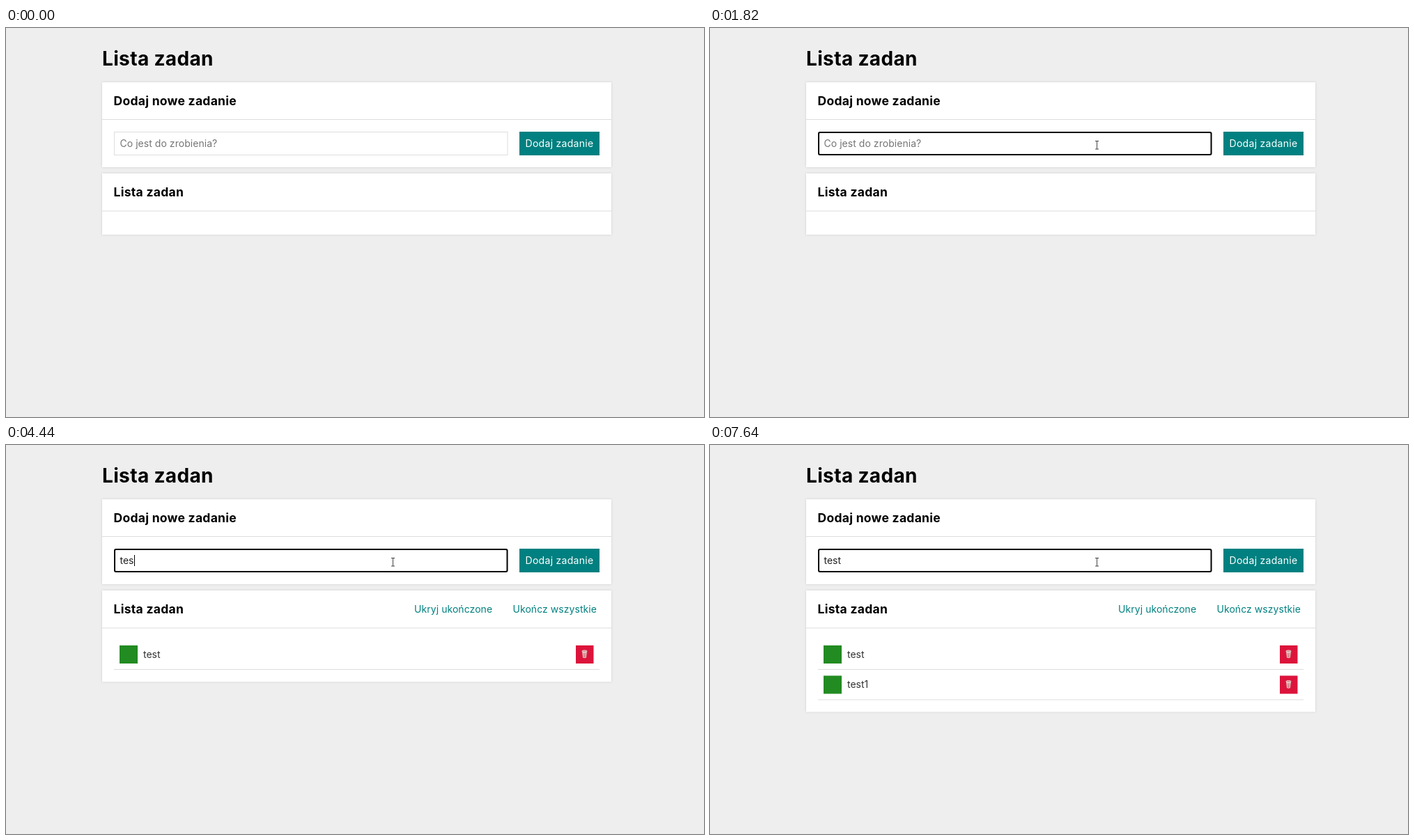
Write an HTML page that moves like this. It is 1002 by 559 pixels and loops after 8000 ms.

```html
<!DOCTYPE html>
<html lang="pl">
<head>
<meta charset="utf-8">
<title>Lista zadan</title>
<style>
  html, body { margin: 0; width: 100%; height: 100%; overflow: hidden; background: #eee; }
  svg { display: block; width: 1002px; height: 559px; font: 14px Inter, "Open Sans", sans-serif; }
  .card { fill: #fff; filter: drop-shadow(0 0 1.5px #ccc); }
  .rule { fill: #ddd; }
  .h1, .h2 { font-weight: 700; fill: #000; }
  .h1 { font-size: 28px; letter-spacing: .35px; }
  .h2 { font-size: 17.5px; letter-spacing: .28px; }
  .link { fill: teal; letter-spacing: .06px; }
  .button { fill: #fff; letter-spacing: .3px; }
  .hint { fill: #757575; letter-spacing: .04px; }
  .typed { fill: #222; }
  .item { fill: #333; }
</style>
</head>
<body>
<svg viewBox="0 0 1002 559">
  <defs>
    <g id="row">
      <rect x="163" y="288" width="26" height="26" fill="forestgreen"/>
      <rect x="818" y="288" width="25.5" height="26" fill="crimson"/>
      <path d="M827 296.5L828 305.5Q830.5 307 833 305.5L834 296.5Z" fill="#e9c9c4"/>
      <path d="M828.7 298.5l.5 6.5M830.5 298.5v7M832.3 298.5l-.5 6.5" stroke="#a8555c" stroke-width=".6"/>
      <ellipse cx="830.5" cy="296.3" rx="3.6" ry="1.3" fill="#c98b8b" stroke="#f4e4dc" stroke-width=".8"/>
      <rect class="rule" x="155" y="322" width="697" height="1"/>
    </g>
  </defs>

  <rect width="1002" height="559" fill="#eee"/>
  <text class="h1" x="138" y="54">Lista zadan</text>

  <rect class="card" x="138" y="78" width="731" height="122"/>
  <rect class="rule" x="138" y="131" width="731" height="1"/>
  <text class="h2" x="154.5" y="111">Dodaj nowe zadanie</text>
  <rect x="155.5" y="149.5" width="564.5" height="33" fill="#fff" stroke="#ddd"/>
  <rect id="focus" x="156" y="150" width="563.5" height="32" rx="2" fill="#fff" stroke="#000" stroke-width="2"/>
  <text id="hint" class="hint" x="163.5" y="171">Co jest do zrobienia?</text>
  <text id="typed" class="typed" x="163.5" y="171"></text>
  <rect id="caret" y="158" width="1" height="16"/>
  <rect x="737" y="149" width="115" height="34" fill="teal"/>
  <text class="button" x="745.5" y="171">Dodaj zadanie</text>

  <rect id="list" class="card" x="138" y="209" width="731" height="88"/>
  <rect class="rule" x="138" y="262.5" width="731" height="1"/>
  <text class="h2" x="154.5" y="242">Lista zadan</text>
  <g id="first">
    <text class="link" x="586" y="240.5">Ukryj ukończone</text>
    <text class="link" x="727.5" y="240.5">Ukończ wszystkie</text>
    <use href="#row"/>
    <text class="item" x="197" y="305.5">test</text>
  </g>
  <g id="second">
    <use href="#row" y="43.5"/>
    <text class="item" x="197" y="349">test1</text>
  </g>

  <g id="pointer">
    <circle id="glow" cx="-1" r="10" fill="#ffff80"/>
    <path id="arrow" d="M0 0V16L3.7 12.5L6.2 18.3L8.6 17.2L6.2 11.6H11.3Z" fill="#fff" stroke="#000" stroke-width=".9"/>
    <path id="beam" d="M-2.5 -5.5H2.5M0 -5.5V6M-2.5 6H2.5" fill="none" stroke="#444"/>
  </g>
</svg>
<script>
  const LOOP = 8000;
  const el = Object.fromEntries([...document.querySelectorAll("svg [id]")].map(node => [node.id, node]));

  // [time, value] pairs; each value holds until the next time
  const typing = [
    [0, ""], [2370, "t"], [2420, "te"], [2630, "tes"], [2690, "test"], [3700, ""],
    [4160, "t"], [4310, "te"], [4440, "tes"], [4570, "test"], [5430, "test1"], [5830, ""],
    [6710, "t"], [6840, "te"], [7040, "tes"], [7110, "test"]
  ];
  const blink = [
    [0, false], [1310, true], [1820, false], [2370, true], [3230, false], [3760, true],
    [5100, false], [5430, true], [5960, false], [6510, true], [7640, false]
  ];

  const at = (track, t) => track.findLast(([start]) => start <= t)[1];
  const show = (node, on) => node.setAttribute("visibility", on ? "visible" : "hidden");

  // Eased travel sampled in discrete steps
  function travel(t, start, gap, steps, from, to) {
    const p = Math.min(1, Math.max(0, Math.floor((t - start) / gap) / (steps - 1)));
    const k = p * p * (3 - 2 * p);
    return from.map((v, i) => v + (to[i] - v) * k);
  }

  const entry = [600, 474], corner = [828, 137], rest = [555.5, 168];

  function draw(t) {
    const [x, y] = t < 810
      ? travel(t, 200, 70, 5, entry, corner)
      : travel(t, 728, 82, 7, corner, rest);
    const inField = x > 155 && x < 720 && y > 149 && y < 183;
    el.pointer.setAttribute("transform", `translate(${x} ${y})`);
    show(el.glow, t >= 200 && t < 1360);
    show(el.arrow, t >= 200 && !inField);
    show(el.beam, t >= 200 && inField);

    const value = at(typing, t);
    if (el.typed.textContent !== value) el.typed.textContent = value;
    show(el.hint, !value);
    show(el.focus, t >= 1310);
    const width = value ? el.typed.getComputedTextLength() : 0;
    el.caret.setAttribute("x", Math.round(164 + width));
    show(el.caret, at(blink, t));

    const items = (t >= 3700) + (t >= 5830);
    el.list.setAttribute("height", 88 + 43.3 * items);
    show(el.first, items > 0);
    show(el.second, items > 1);
  }

  const begin = performance.now();
  function tick() {
    draw((performance.now() - begin) % LOOP);
    requestAnimationFrame(tick);
  }
  tick();
</script>
</body>
</html>
```
